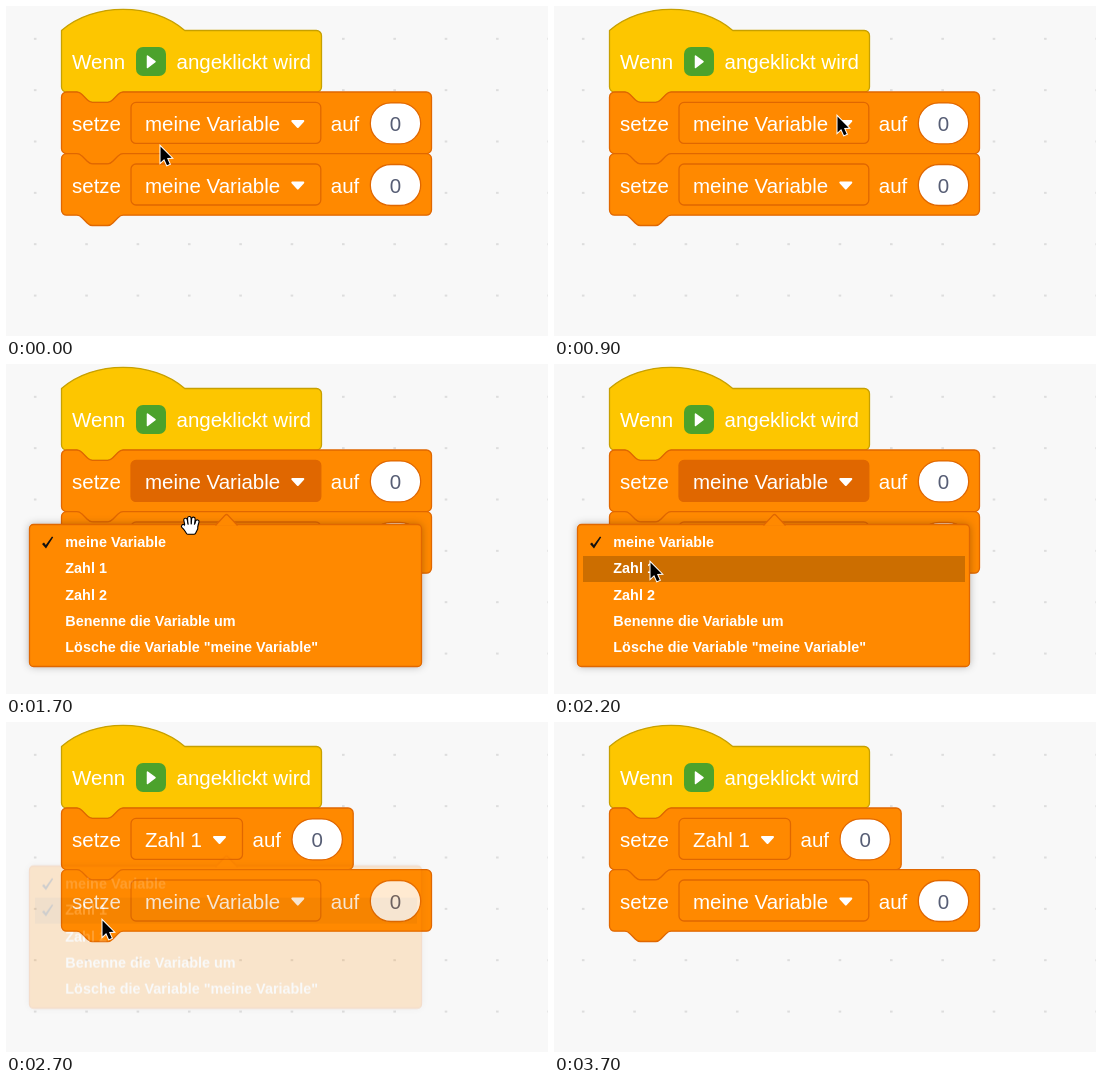
An HTML page with a canvas that plays this animation: 542x330 px, repeating every 4300 ms.

```html
<!DOCTYPE html>
<html lang="de">
<head>
<meta charset="utf-8">
<title>Variable auswählen</title>
<style>
html, body { margin: 0; width: 100%; height: 100%; overflow: hidden; background: #f8f8f8; }
canvas { display: block; }
</style>
</head>
<body>
<canvas id="stage" width="542" height="330"></canvas>
<script>
const W = 542, H = 330, LOOP = 4300, STEP = 100;
const ctx = document.getElementById('stage').getContext('2d');
const layer = document.createElement('canvas');
layer.width = W;
layer.height = H;
const menuCtx = layer.getContext('2d');

const SCALE = 1.284, LEFT = 55.5, ROW = 61.6;
const FONT = '"Liberation Sans", Arial, sans-serif';
const ORANGE = '#ff8900', ORANGE_EDGE = '#e06700', YELLOW = '#fdc600', YELLOW_EDGE = '#c7a000';
const NOTCH = 'c2 0 3 1 4 2l4 4c1 1 2 2 4 2h12c2 0 3-1 4-2l4-4c1-1 2-2 4-2';
const NOTCH_BACK = 'c-2 0-3 1-4 2l-4 4c-1 1-2 2-4 2h-12c-2 0-3-1-4-2l-4-4c-1-1-2-2-4-2';

const MENU = { x: 23.5, y: 160.5, w: 392, h: 142, rowTop: 165.6, rowH: 26.25 };
const ITEMS = ['meine Variable', 'Zahl 1', 'Zahl 2', 'Benenne die Variable um',
  'Lösche die Variable "meine Variable"'];
const OPEN_AT = 1105, PICK_AT = 2600, CLOSE_AT = 2570, FADE = 250;

// time, x, y, shape used until the next key
const CURSOR = [
  [0, 154.5, 140.5, 'arrow'],
  [100, 159, 148, 'hand'],
  [600, 279, 126, 'hand'],
  [700, 281, 119, 'arrow'],
  [900, 283.5, 110.5, 'arrow'],
  [1500, 283.5, 110.5, 'arrow'],
  [1700, 184.5, 161.5, 'hand'],
  [2100, 110, 204, 'hand'],
  [2200, 96.5, 198.5, 'arrow'],
  [3100, 96.5, 198.5, 'arrow'],
  [3200, 105, 190, 'hand'],
  [3600, 75, 31, 'hand'],
  [3700, 0, 0, 'none']
];

const clamp = v => Math.min(1, Math.max(0, v));
const mix = (a, b, p) => a + (b - a) * p;
const smooth = p => p * p * (3 - 2 * p);

// cubic-bezier(.25, .1, .25, 1)
function ease(p) {
  const curve = (a, b, u) => 3 * a * u * (1 - u) ** 2 + 3 * b * u * u * (1 - u) + u ** 3;
  let lo = 0, hi = 1;
  for (let i = 0; i < 24; i++) {
    const mid = (lo + hi) / 2;
    if (curve(.25, .25, mid) < p) lo = mid; else hi = mid;
  }
  return curve(.1, 1, lo);
}

function text(c, str, x, y, font, color = '#fff', align = 'left') {
  c.font = `${font} ${FONT}`;
  c.fillStyle = color;
  c.textAlign = align;
  c.fillText(str, x, y);
}

const label = (str, x, y, color, align) => text(ctx, str, x, y, '20.5px', color, align);

function roundBox(c, x, y, w, h, r, fill, edge) {
  c.beginPath();
  c.roundRect(x, y, w, h, r);
  c.fillStyle = fill;
  c.fill();
  if (edge) {
    c.strokeStyle = edge;
    c.lineWidth = 1.28;
    c.stroke();
  }
}

function blockShape(y, right, isHat) {
  const w = (right - LEFT) / SCALE;
  const top = isHat ? 'M0 0c25-22 71-22 96 0' : 'M0 4a4 4 0 0 1 4-4H12' + NOTCH;
  const path = new Path2D(`${top}H${w - 4}a4 4 0 0 1 4 4V44a4 4 0 0 1-4 4H48${NOTCH_BACK}H4a4 4 0 0 1-4-4z`);
  ctx.save();
  ctx.translate(LEFT, y);
  ctx.scale(SCALE, SCALE);
  ctx.fillStyle = isHat ? YELLOW : ORANGE;
  ctx.strokeStyle = isHat ? YELLOW_EDGE : ORANGE_EDGE;
  ctx.lineWidth = 1;
  ctx.fill(path);
  ctx.stroke(path);
  ctx.restore();
}

function drawHat() {
  blockShape(24.5, 315.5, true);
  label('Wenn', 66, 63);
  roundBox(ctx, 130, 41, 30, 29, 7, '#4ca22c');
  ctx.beginPath();
  ctx.moveTo(141.5, 50);
  ctx.lineTo(149, 55.7);
  ctx.lineTo(141.5, 61.5);
  ctx.closePath();
  ctx.fillStyle = ctx.strokeStyle = '#fff';
  ctx.lineWidth = 1.5;
  ctx.lineJoin = 'round';
  ctx.fill();
  ctx.stroke();
  label('angeklickt wird', 170.5, 63);
}

function drawSetter(y, name, fieldRight, active) {
  blockShape(y, fieldRight + 110.7, false);
  label('setze', 66, y + 39);
  roundBox(ctx, 125, y + 10.4, fieldRight - 125, 41, 5, active ? ORANGE_EDGE : ORANGE, ORANGE_EDGE);
  label(name, 139, y + 39);
  const ax = fieldRight - 23, ay = y + 29;
  ctx.beginPath();
  ctx.moveTo(ax - 5.5, ay);
  ctx.lineTo(ax + 5.5, ay);
  ctx.lineTo(ax, ay + 6);
  ctx.closePath();
  ctx.fillStyle = ctx.strokeStyle = '#fff';
  ctx.lineWidth = 2;
  ctx.lineJoin = 'round';
  ctx.fill();
  ctx.stroke();
  label('auf', fieldRight + 10, y + 39);
  roundBox(ctx, fieldRight + 49.5, y + 10.9, 50.4, 41, 20.5, '#fff', ORANGE_EDGE);
  label('0', fieldRight + 74.7, y + 39, '#575e75', 'center');
}

function drawCheck(c, y) {
  c.beginPath();
  c.moveTo(36, y + 1.5);
  c.lineTo(38, y);
  c.lineTo(39.8, y + 2.5);
  c.lineTo(46, y - 6);
  c.lineTo(47.2, y - 5.2);
  c.lineTo(40, y + 6);
  c.closePath();
  c.fillStyle = '#111';
  c.fill();
}

function drawMenu(shown, lift, hover, picked) {
  const c = menuCtx, { x, y, w, h, rowTop, rowH } = MENU;
  c.clearRect(0, 0, W, H);
  c.save();
  c.shadowColor = 'rgba(0,0,0,.3)';
  c.shadowBlur = 8;
  roundBox(c, x, y, w, h, 4, ORANGE);
  c.restore();
  roundBox(c, x, y, w, h, 4, ORANGE, ORANGE_EDGE);
  c.beginPath();
  c.moveTo(209.5, y + 1);
  c.lineTo(219, 151.2);
  c.quadraticCurveTo(220.5, 149.8, 222, 151.2);
  c.lineTo(231.5, y + 1);
  c.fillStyle = ORANGE;
  c.fill();
  c.stroke();
  if (hover >= 0) {
    c.fillStyle = 'rgba(0,0,0,.2)';
    c.fillRect(29, Math.round(rowTop + hover * rowH), 382, 26);
  }
  ITEMS.forEach((item, i) => text(c, item, 59.3, Math.round(183 + i * rowH), 'bold 14.4px'));
  drawCheck(c, 178.5);
  if (picked) drawCheck(c, 178.5 + rowH);
  ctx.globalAlpha = shown;
  ctx.drawImage(layer, 0, -lift);
  ctx.globalAlpha = 1;
}

function drawArrow() {
  ctx.beginPath();
  [[0, 0], [0, 16], [3.7, 12.6], [6.5, 18.7], [9.2, 17.5], [6.5, 11.6], [11.2, 11.3]]
    .forEach(p => ctx.lineTo(...p));
  ctx.closePath();
  ctx.lineJoin = 'miter';
  ctx.lineWidth = 2;
  ctx.strokeStyle = '#fff';
  ctx.stroke();
  ctx.fillStyle = '#000';
  ctx.fill();
}

function drawHand() {
  const palm = new Path2D('M-4.5 0L5.5 0L5.5 3L3.5 7L-2.5 7L-5 3z');
  const fingers = new Path2D('M-3.5 1L-5-5.5M-.8 0L-1.2-7.2M2.3 0L2.9-6.6M5 2L6.8-3.8M-3.5 4.5L-7.3.8');
  ctx.lineCap = ctx.lineJoin = 'round';
  ctx.strokeStyle = ctx.fillStyle = '#000';
  ctx.lineWidth = 4.6;
  ctx.stroke(fingers);
  ctx.stroke(palm);
  ctx.strokeStyle = ctx.fillStyle = '#fff';
  ctx.lineWidth = 2.4;
  ctx.stroke(fingers);
  ctx.stroke(palm);
  ctx.fill(palm);
  ctx.strokeStyle = '#000';
  ctx.lineWidth = .8;
  ctx.stroke(new Path2D('M-2.4-1L-3-4M.7-1.5L.8-4.5M3.9-1L4.6-3.5'));
}

function cursorAt(t) {
  const i = CURSOR.findLastIndex(k => k[0] <= t);
  const a = CURSOR[i], b = CURSOR[i + 1] || a;
  const p = a === b ? 0 : smooth((t - a[0]) / (b[0] - a[0]));
  return { x: mix(a[1], b[1], p), y: mix(a[2], b[2], p), shape: a[3] };
}

function drawCursor({ x, y, shape }) {
  if (shape === 'none') return;
  ctx.save();
  ctx.translate(x, y);
  shape === 'hand' ? drawHand() : drawArrow();
  ctx.restore();
}

function drawBackground() {
  ctx.fillStyle = '#f8f8f8';
  ctx.fillRect(0, 0, W, H);
  ctx.fillStyle = '#dddddd';
  for (let x = 29.2; x < W + 2; x += 51.35)
    for (let y = 32.8; y < H; y += 51.35) ctx.fillRect(x - 1.3, y - 1, 2.6, 2);
}

function draw(t) {
  const picked = t >= PICK_AT;
  const cursor = cursorAt(t);
  drawBackground();
  drawHat();
  drawSetter(86, picked ? 'Zahl 1' : 'meine Variable', picked ? 236.5 : 314.8, t >= 1100 && !picked);
  drawSetter(86 + ROW, 'meine Variable', 314.8, false);

  const opened = ease(clamp((t - OPEN_AT) / FADE));
  const closed = picked ? ease(clamp((t - CLOSE_AT) / FADE)) : 0;
  const shown = opened * (1 - closed);
  if (shown > .002) {
    const hover = Math.floor((cursor.y - MENU.rowTop) / MENU.rowH);
    drawMenu(shown, 20 * (1 - shown), hover, picked);
  }
  drawCursor(cursor);
}

const start = performance.now();
function tick() {
  const t = (performance.now() - start) % LOOP;
  draw(Math.floor(t / STEP) * STEP);
  requestAnimationFrame(tick);
}
tick();
</script>
</body>
</html>
```
